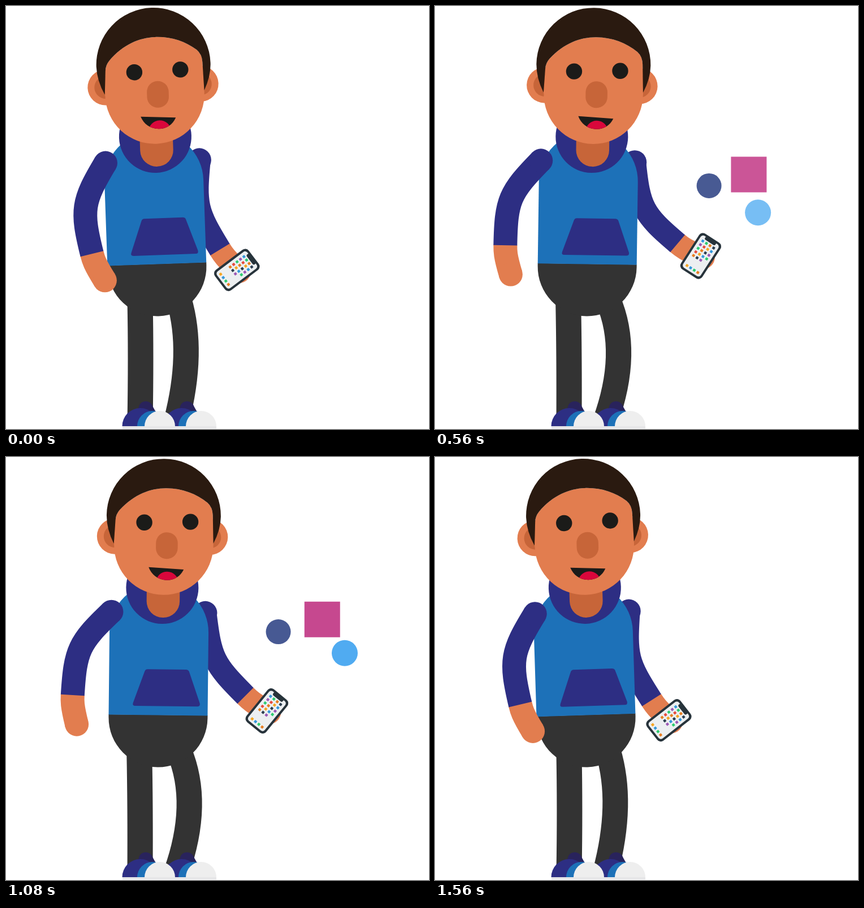
Recreate the animation shown at these times as an HTML page with a canvas. Size 748 by 748 pixels, loop 1600 ms.

```html
<!DOCTYPE html>
<html lang="en">
<head>
<meta charset="utf-8">
<title>Phone in hand</title>
<style>
  html, body { margin: 0; width: 100%; height: 100%; overflow: hidden; background: #fff; }
  canvas { display: block; width: 100vw; height: 100vh; }
</style>
</head>
<body>
<canvas id="stage" width="748" height="748"></canvas>
<script>
const ctx = document.getElementById('stage').getContext('2d');
const LOOP = 1600, STEP = 40, TAU = Math.PI * 2;
const NAVY = '#2d2e83', BLUE = '#1d71b8', DARK = '#333333', SKIN = '#e27d4f',
      SHADE = '#c76539', HAIR = '#2a1a10', BLACK = '#1b1b19', CASE = '#27333b';
const APP_COLORS = ['#f5a623', '#3498db', '#2ecc71', '#e67e22', '#2c3e50', '#9b59b6', '#e74c3c'];

// Each badge eases out of the phone to its resting place and falls back.
const BADGES = [
  { color: '#475993', radius: 22, origin: [523, 430], rest: [480.5, 306], out: [400, 632], back: [1050, 1240] },
  { color: '#c13584', side: 63, origin: [500, 435], rest: [572, 255.5], out: [360, 750], back: [1000, 1190] },
  { color: '#50abf1', radius: 23, origin: [500, 413], rest: [601.5, 345], out: [440, 705], back: [1050, 1240] }
];

const mix = (a, b, k) => a + (b - a) * k;
const progress = (t, [start, end]) => Math.min(1, Math.max(0, (t - start) / (end - start)));
const smooth = k => k * k * (3 - 2 * k);

// Straight-line motion through [time, value] pairs.
function track(t, keys) {
  const i = keys.findIndex(key => key[0] > t), [a, b] = [keys[i - 1], keys[i]];
  return mix(a[1], b[1], progress(t, [a[0], b[0]]));
}

// Point at a distance; 0 degrees hangs straight down, positive swings right.
function polar([x, y], length, degrees) {
  const a = degrees * Math.PI / 180;
  return [x + length * Math.sin(a), y + length * Math.cos(a)];
}

function fill(color, trace) {
  ctx.fillStyle = color;
  ctx.beginPath();
  trace();
  ctx.fill();
}

const circle = (color, x, y, r) => fill(color, () => ctx.arc(x, y, r, 0, TAU));
const dome = (color, x, y, r) => fill(color, () => ctx.arc(x, y, r, Math.PI, TAU));
const box = (color, x, y, w, h, r = 0) => fill(color, () => ctx.roundRect(x, y, w, h, r));
const shape = (color, d) => { ctx.fillStyle = color; ctx.fill(new Path2D(d)); };

function limb(color, width, from, bendA, bendB, to) {
  ctx.strokeStyle = color;
  ctx.lineWidth = width;
  ctx.beginPath();
  ctx.moveTo(...from);
  ctx.bezierCurveTo(...bendA, ...bendB, ...to);
  ctx.stroke();
}

// The upper body leans about the hips.
const HIP = [268, 506];
function leaned([x, y], degrees) {
  const a = degrees * Math.PI / 180, c = Math.cos(a), s = Math.sin(a);
  const dx = x - HIP[0], dy = y - HIP[1];
  return [HIP[0] + dx * c - dy * s, HIP[1] + dx * s + dy * c];
}

// Bent sleeve and forearm; returns the hand position.
function drawArm(shoulder, upper, fore, reach, width) {
  const cuff = polar(shoulder, 162.5, upper), hand = polar(cuff, reach, fore);
  const cuffAngle = mix(upper, fore, .65), shoulderAngle = 2 * upper - cuffAngle;
  limb(SKIN, width, polar(cuff, -1, cuffAngle), polar(cuff, 10, cuffAngle), polar(cuff, 18, cuffAngle), hand);
  circle(SKIN, ...hand, 21);
  limb(NAVY, width, shoulder, polar(shoulder, 80, shoulderAngle), polar(cuff, -80, cuffAngle), cuff);
  circle(NAVY, ...shoulder, 21);
  return hand;
}

function drawLegs(sway) {
  const knee = [342 + 9 * sway, 612], shin = [238 - sway, 620];
  const leg = (hip, bend, foot) => {
    const toward = end => end.map((v, i) => mix(v, bend[i], 2 / 3));
    limb(DARK, 45, hip, toward(hip), toward(foot), foot);
  };
  leg([236 - sway, 520], shin, [237, 735]);
  leg([306, 520], knee, [301, 735]);
}

function drawShoe(x) {
  ctx.save();
  ctx.translate(x, 0);
  shape('#29235c', 'M28 712 Q30 699 42 699 Q51 700 54 709 L59 718 L50 730 L28 730 Z');
  dome(NAVY, 31.5, 743, 32);
  dome(BLUE, 53, 743, 27);
  dome('#eeeeee', 66, 743, 27);
  box('#e6e6e8', 0, 743, 93, 4);
  ctx.restore();
}

function drawPhone([x, y], degrees) {
  ctx.save();
  ctx.translate(x, y);
  ctx.rotate(degrees * Math.PI / 180);
  box(CASE, -22.5, -37.5, 45, 75, 8);
  box('#eceff1', -18.5, -33.5, 37, 67, 5);
  box(CASE, -11, -35, 22, 6.5, 3);
  const app = (col, top, color) =>
    box(APP_COLORS[color % 7], -13.6 + col * 7.6, top, 4.6, 4.6, .8);
  for (let i = 0; i < 19; i++) {
    const row = Math.floor(i / 4);
    app(i % 4, -26.5 + row * 7.6, i + 1);
  }
  for (let col = 0; col < 4; col++) app(col, 25, col);
  ctx.restore();
}

function drawBadge({ color, radius, side, origin, rest, out, back }, t) {
  const away = (1 - progress(t, out)) ** 2 + progress(t, back) ** 2;
  const [x, y] = rest.map((v, i) => mix(v, origin[i], away));
  ctx.globalAlpha = Math.min(1, Math.max(0, 1 - away) * 1.1);
  if (side) box(color, x - side / 2, y - side / 2, side, side);
  else circle(color, x, y, radius);
  ctx.globalAlpha = 1;
}

function drawTorso() {
  fill(DARK, () => {
    ctx.moveTo(181, 456);
    ctx.lineTo(356, 456);
    ctx.arc(268.5, 461, 87.5, 0, Math.PI);
  });
  fill(BLUE, () => {
    ctx.moveTo(181, 456.5);
    ctx.arc(268.5, 310, 87.5, Math.PI, TAU);
    ctx.lineTo(356, 456.5);
  });
  shape(NAVY, 'M249 375.5 H317 Q321 375.5 322.5 379 L342 435 Q343 440.5 338 440.5 H228 Q222 440.5 224 435 L244 379 Q245.5 375.5 249 375.5 Z');
  circle(NAVY, 273.5, 231, 64);
  box(SHADE, 246, 200, 58.5, 84, [0, 0, 29, 29]);
}

function drawHead() {
  circle(SKIN, 188.5, 141, 31.5);
  circle(SKIN, 357, 140.5, 31.5);
  circle(SHADE, 189, 141, 20);
  circle(SHADE, 357, 141, 19.5);

  const hairline = 'M187 154 L189.5 112 Q190 102 197 94 C222 66 252 55 279 55 C307 55 332 64 352 80 Q361 88 361.5 102 L363 152';
  shape(SKIN, hairline + ' V156 A87.5 87.5 0 0 1 187.5 156 Z');
  shape(HAIR, hairline + ' Q375.7 127 375.7 104 A101 101 0 0 0 173.7 104 Q174 129 187 154 Z');

  circle(BLACK, 240.5, 116, 14.2);
  circle(BLACK, 322, 114, 14.2);
  box(SHADE, 261.5, 133, 38.5, 47, 19);

  ctx.save();
  ctx.clip(new Path2D('M249 195 L311 198.5 C305 211 294 218 280 217.5 C265 217 254 208 249 195 Z'));
  box(BLACK, 245, 190, 70, 32);
  circle('#d9073b', 282, 222.5, 20);
  ctx.restore();
}

function draw(t) {
  const sway = 1 - 2 * Math.abs(t / 800 - 1);
  const lean = 2 * sway;
  const swing = smooth(1 - Math.abs((t % 800) / 400 - 1));

  ctx.fillStyle = '#fff';
  ctx.fillRect(0, 0, 748, 748);

  drawLegs(sway);
  drawShoe(279);
  drawShoe(206);
  BADGES.forEach(badge => drawBadge(badge, t));

  const lift = track(t, [[0, 11], [400, 30], [800, 26.5], [1200, 26.5], [LOOP, 11]]);
  const fore = track(t, [[0, 39.5], [240, 62.5], [900, 62.5], [1200, 51.5], [LOOP, 39.5]]) - lean;
  const [handX, handY] = drawArm(leaned([350, 275], lean), lift - lean, fore, 51, 40);
  drawPhone([handX - 4, handY - 2], 94.5 - fore);

  ctx.save();
  ctx.translate(...HIP);
  ctx.rotate(lean * Math.PI / 180);
  ctx.translate(-HIP[0], -HIP[1]);
  drawTorso();
  drawHead();
  ctx.restore();

  drawArm(leaned([184, 274.5], lean), mix(-10.5, -28.2, swing) - lean, mix(24, 4.4, swing) - lean, 52.3, 42);
}

function tick() {
  const t = performance.now() % LOOP;
  draw(Math.floor(t / STEP) * STEP);
  requestAnimationFrame(tick);
}
tick();
</script>
</body>
</html>
```
